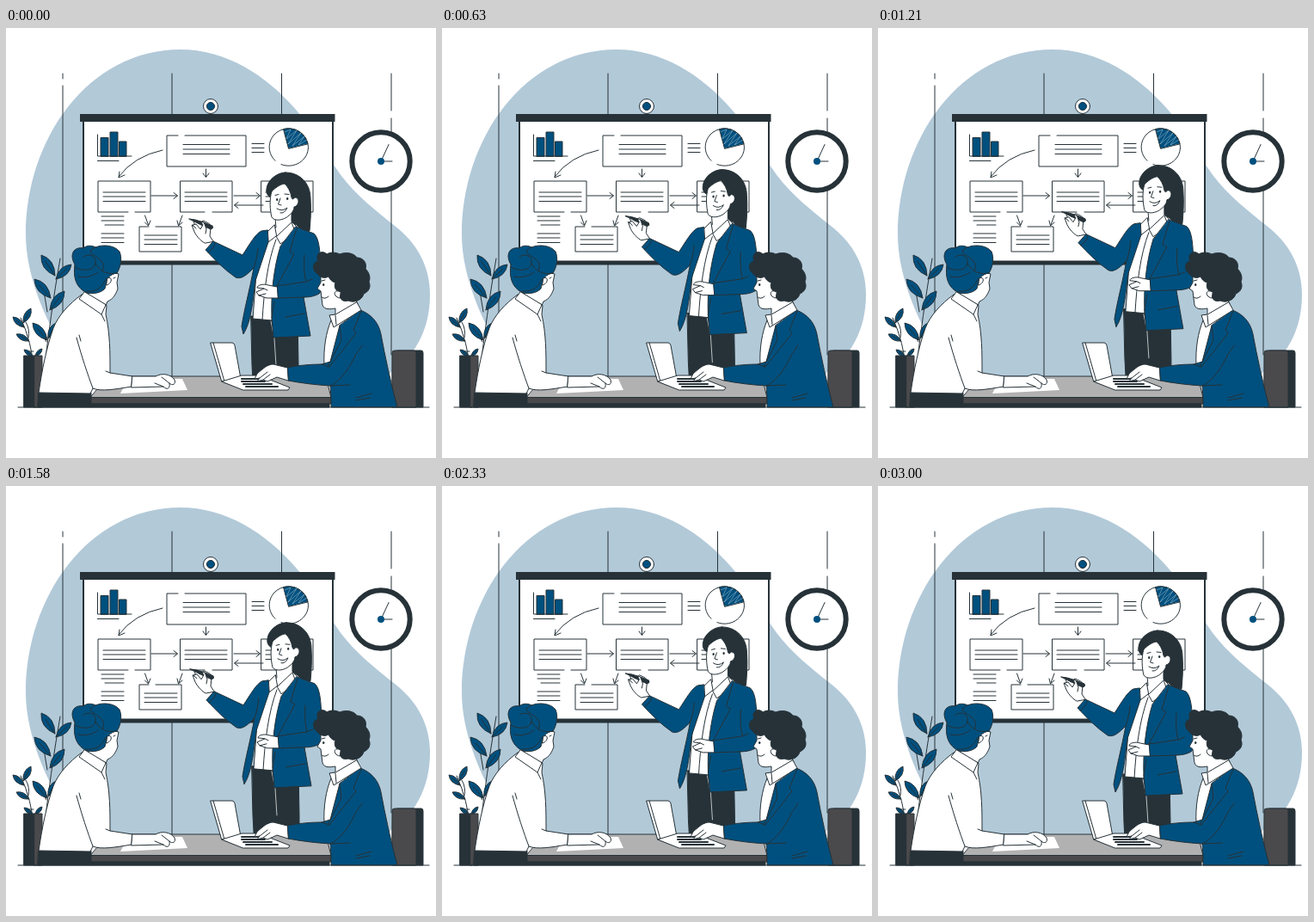
An HTML page that plays this animation: 500x500 px, repeating every 3040 ms.

```html
<!DOCTYPE html>
<html lang="en">
<head>
<meta charset="utf-8">
<title>Team meeting</title>
<style>
html, body { margin: 0; width: 100%; height: 100%; overflow: hidden; background: #fff; }
svg { display: block; width: 100vw; height: 100vh; }
path, circle { stroke: #263238; stroke-linecap: round; stroke-linejoin: round; }
.l { fill: none; }
.w { fill: #fff; }
.d { fill: #263238; }
.b { fill: #00507f; }
.g { fill: #b1b1b2; }
.c { fill: #4a494b; }
.n { stroke: none; }
</style>
</head>
<body>
<svg viewBox="0 0 500 500">
  <path class="n" fill="#b2c9d8" d="M203 25C255 25 302 54 338 96C360 121 372 148 390 172C407 194 428 211 452 230C479 251 493 278 493 310C493 350 476 385 440 405H90C64 375 23 304 23 240C23 130 95 25 203 25Z"/>
  <path class="l" d="M66 53v6M66 67v275M193 53v352M320.500 53v352M448 53v43M448 105v275"/>

  <g id="board">
    <path class="w" stroke-width="2" d="M90 105H380V272H90Z"/>
    <path class="d n" d="M86 100H382.500V109H86ZM89 270.500H381V275.500H89Z"/>
    <circle class="w" cx="238" cy="91" r="8.500"/>
    <circle class="b" cx="238" cy="91" r="4.600"/>
    <path class="b" d="M110 149V127.500h9V149ZM121 149V121h9V149ZM131.500 149V132h8.500V149Z"/>
    <path class="l" d="M106.500 124V149H146M106.500 154.500H131
      M200 125H187V161H279V125H208M206 135.500h54M206 141h54M206 146.500h54
      M286 134.500h14M286 139.500h14M286 144.500h14
      M142 214H107V178H168V214H150M113 191h49M113 196h49M113 201.500h49
      M231 214H202.500V178H263V214H240M208 191h49M208 196h49M208 201.500h49
      M297 178H357V214H297ZM302 191h49M302 196h49M302 201.500h49
      M166 231H155V260H204V231H174M161 241h38M161 246h38M161 251.500h38
      M111 219h26M111 224h26M115 229h22M111 239h26M111 244h26M111 249.500h26"/>
    <path class="l" d="M182 142Q149 149 131 173M132 167L131 174L138 171
      M169 195H199M195 191.500L199.500 195L195 198.500M265 195H295M291 191.500L295.500 195L291 198.500
      M299 206H266M270 202.500L265.500 206L270 209.500M232.500 164V173M229 169L232.500 173.500L236 169
      M161.500 218L165.500 229M161.500 226L165.500 230L168 224M205 218L201 229M199 224L200.500 230L205 226"/>
    <path class="w n" d="M306 138.500a22.700 21.700 0 1 0 45.400 0a22.700 21.700 0 1 0-45.400 0"/>
    <path class="l" d="M313 154.200A22.700 21.700 0 1 1 320 158.600"/>
    <path class="b" d="M328.500 140L322.500 117.600A22.700 21.700 0 0 1 350.800 134.500Z"/>
    <path class="l" style="stroke:#b2c9d8" stroke-width=".5" d="M324 121L331 118L326 129L338 119L328 135L343 122L333 137L347 126L340 136L350 130"/>
  </g>

  <g id="clock">
    <circle class="w" cx="436" cy="155" r="33.700" stroke-width="6"/>
    <path class="l" d="M445 135.500L436 155H449"/>
    <circle class="b n" cx="436" cy="155" r="4"/>
  </g>

  <g id="plant">
    <path class="l" d="M33 400Q30 365 17 337M26 360Q28 350 23 342M32 376L25 376M43 410Q52 330 63 268M47 365L38 350M48 330L43 300"/>
  </g>

  <path class="d" d="M21 381H35V441H21Z"/>
  <path class="c" d="M33 381H42V441H33Z"/>
  <path class="d" d="M455 375H483Q485 375 485 378V441H455Z"/>
  <path class="c" d="M449 377Q449 375 452 375H474Q477 375 477 378V441H449Z"/>

  <g id="speaker">
    <path class="d" d="M285 335H339L340 392V430H288L286 392Z"/>
    <path class="l" style="stroke:#fff" stroke-width=".7" d="M308 341L312 361L314 392"/>
    <path class="d" d="M325 168C315 168 304 177 303 187C302 192 305 196 308 197L329 225L338 229C342 235 348 237 353 236C354 224 355 212 354 198C354 181 342 168 325 168Z"/>
    <path class="w" d="M313 221L314 232L303 238L291 285L287 338L309 340L319 280L338 231L332 225V212Z"/>
    <path class="w" d="M309 190C306 199 307 212 309 220C312 225 323 224 329 218C333 215 335 211 335 208C341 207 342 197 336 197C334 199 333 200 332 197C331 190 328 185 324 181C318 182 313 186 309 190Z"/>
    <path class="l" d="M313 194.500L317 193.500M324 193L329 193.500M319 198L316.500 205L320 206M315 210Q321 214 327 209Q324 216 319 215"/>
    <path class="d n" d="M314 199.500a1.200 1.500 0 1 0 2.400 0a1.200 1.500 0 1 0-2.400 0M326 198.500a1.200 1.500 0 1 0 2.400 0a1.200 1.500 0 1 0-2.400 0"/>
    <path class="w" d="M312 229L303 238L305 249L314 242L319 251L337 239L332 226L315 242Z"/>
    <path class="l" d="M314 246C304 272 300 306 298 340"/>

    <path class="b" d="M304 235L297 236C290 239 283 252 275 264L241 248L232 258C243 270 254 281 267 290C274 293 281 286 288 279C283 306 277 327 274 347L276 356C285 342 287 318 290 294L305 249Z"/>
    <path class="b" d="M337 231L358 239C365 245 365 263 366 277C370 292 370 303 364 309C357 313 349 313 346 313L354 358L311 360L309 337C308 310 311 280 319 254Z"/>
    <path class="l" d="M288 279C291 271 292 264 293 256M243 250Q243 255 235 261M338 233L330 260L335 263L314 302M347 264C346 280 347 287 349 295L315 300M316 314L347 313M325 336L347 332M349 295L356 292M309 337L312 318"/>
    <path class="w" d="M315 301L305 299C299 297 292 299 292 302L300 303L291 307L294 311L303 314L316 314Z"/>
    <path class="l" d="M294 311L302 309M300 303L304 305"/>

    <path class="w" d="M231 250C227 248 222 243 219 237L216 229L221 232L218 225C220 222 222 225 224 228L229 224C234 226 239 228 238 232L237 242L241 248Z"/>
    <path class="d" d="M213 222L220 223L230 226L240 230Q242 233 238 234L229 230Z"/>
    <path class="w" d="M221 233L217 229L221 228L226 234L229 229C226 225 229 224 231 228L233 234L232 239"/>
  </g>

  <path class="g" d="M119 405H372L378 430H98Z"/>
  <path class="c" d="M98 429.500H378V437H98Z"/>
  <path class="d" d="M99 437H376V441H99Z"/>
  <path class="w n" d="M142 408H205L211 421L133 425Z"/>

  <g id="listener">
    <path class="d" d="M38 424H99V441H37Z"/>
    <path class="w" d="M118 283L131 286L129 296L130 303C128 309 125 315 118 318L115 325L94 315L99 300Z"/>
    <path class="l" d="M127 290L125 291"/>
    <path class="b" d="M80 275C73 263 79 254 90 256C94 252 101 253 104 255C113 251 127 253 132 260C135 267 134 277 129 285C123 286 119 289 117 294L115 303C110 309 96 311 89 305C81 299 78 289 80 275Z"/>
    <path class="l" d="M80 278C88 283 102 283 104 274C106 266 97 261 90 266M104 255C98 257 96 261 102 264C111 270 116 273 112 283M104 274C112 287 122 286 129 285M84 289C92 291 100 289 107 284M93 306C105 307 112 302 116 292"/>
    <path class="w" d="M118 291C124 288 124 297 117 299Z"/>
    <path class="w" d="M88 310C73 321 61 334 55 349C47 372 42 397 38 424L98 425L101 419C111 423 127 420 146 417L147 405L121 401C121 376 121 356 116 333L117 323Z"/>
    <path class="w" d="M91 307L85 315L111 333L116 322Z"/>
    <path class="l" d="M82 360C88 382 95 403 101 419M87 364L85 357M121 401L116 399M111 333L115 341"/>
    <path class="w" d="M147 405L174 405C181 401 191 402 196 409C198 415 193 416 190 413C191 420 187 421 183 417L146 418Z"/>
    <path class="l" d="M183 417L173 413M190 413L181 406"/>
  </g>

  <g id="laptop">
    <path class="w" d="M238 366L263 366Q265 366 266 369L275 419L251 411Z"/>
    <path class="l" d="M241 366L254 411L274 418"/>
    <path class="w" d="M251 411L274 404H294L330 418L328 421H276Z"/>
    <path class="l" stroke-width="2" stroke-dasharray="3 1" d="M274 408H296M274 411H302M276 414H309M279 417H316"/>
  </g>

  <g id="writer">
    <path class="w" d="M366 288L366 296L362 303L366 306L368 322C370 328 377 327 383 326L383 337L409 321L395 290Z"/>
    <path class="d n" d="M368 298.500a1.200 1.500 0 1 0 2.400 0a1.200 1.500 0 1 0-2.400 0"/>
    <path class="l" d="M367 294L371 293M367 313Q371 316 375 312"/>
    <path class="d" d="M361 285C355 280 357 272 363 271C359 263 367 257 373 263C378 260 384 261 388 263C396 260 405 262 408 267C416 267 420 274 418 280C423 285 424 291 422 295C425 302 421 307 416 309C414 317 404 320 398 317C391 319 387 315 389 307C383 307 381 300 383 296C378 295 376 291 375 289C370 292 365 290 361 285Z"/>
    <path class="w" d="M389 307C380 302 380 313 388 314Z"/>
    <path class="w" d="M378 340C372 354 369 373 370 392L390 395L407 342L405 328Z"/>
    <path class="b" d="M412 328C425 333 433 342 436 356C441 383 447 411 455 441H378V430L377 416C360 415 344 413 328 410L327 395C341 392 356 391 367 391L377 388L388 346Z"/>
    <path class="w" d="M383 333L376 334L381 348L413 328L408 319Z"/>
    <path class="l" d="M383 334L384 345M388 346L390 363L374 394M413 329L404 351L407 355L376 394M376 394L367 391M407 379C401 392 391 410 377 416M377 416L400 415M407 430L425 425M407 433L423 430M408 378L414 369"/>
    <path class="w" d="M327 395L311 391C304 391 299 396 292 402L289 408L295 407L292 411L299 409L304 411L315 406L328 410Z"/>
    <path class="l" d="M295 407L304 400M299 409L307 403"/>
  </g>
  <path class="l" d="M14 441H492"/>
</svg>
<script>
const LOOP = 3040, RISE = 9.2, SWAY = 1;
const speaker = document.getElementById('speaker');
const plant = document.getElementById('plant');

// Each leaf: base x, y, tip x, y
const leaves = [
  [57, 288, 41, 264], [58, 292, 76, 275], [52, 314, 33, 292], [51, 328, 68, 306],
  [48, 363, 31, 343], [49, 361, 58, 343],
  [21, 348, 8, 336], [20, 343, 29, 326], [27, 364, 12, 356],
  [31, 382, 21, 374], [34, 382, 42, 373]
];

function addLeaf([x, y, tx, ty]) {
  const dx = tx - x, dy = ty - y;
  const side = s => `${x + dx * .55 - dy * s} ${y + dy * .55 + dx * s}`;
  const leaf = document.createElementNS('http://www.w3.org/2000/svg', 'path');
  leaf.setAttribute('class', 'b');
  leaf.setAttribute('d', `M${x} ${y}Q${side(.36)} ${tx} ${ty}Q${side(-.36)} ${x} ${y}L${x + dx * .7} ${y + dy * .7}`);
  plant.append(leaf);
}
leaves.forEach(addLeaf);

function draw() {
  const phase = performance.now() % LOOP / LOOP;
  const lift = (1 - Math.cos(phase * 2 * Math.PI)) / 2;
  speaker.setAttribute('transform', `translate(${SWAY * lift} ${-RISE * lift})`);
  requestAnimationFrame(draw);
}
draw();
</script>
</body>
</html>
```
